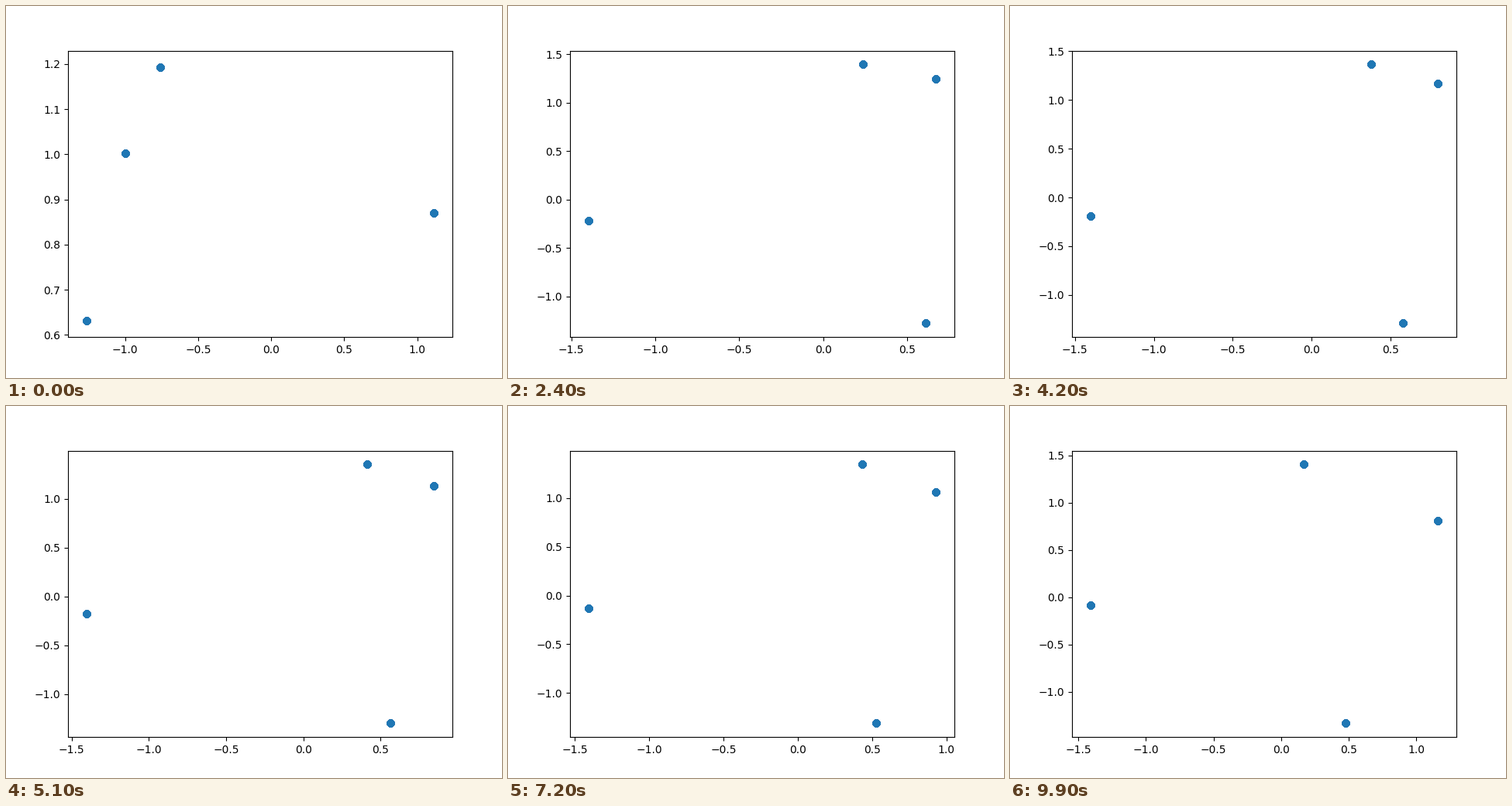
Animation, 640 px wide and 480 px high, one loop 10000 ms. Source, as a matplotlib script:

```python
import numpy as np
import matplotlib.pyplot as plt
from matplotlib.animation import FuncAnimation

FRAMES = 100
RADIUS = np.sqrt(2)
COPIES = 100     # stacked points give the hard marker edge
MARGIN = 0.05
MARKER_PX = 3    # marker extent counted into the data limits

# Degrees on the circle: middle of the pair, half its gap, third, fourth point
START = np.array([128.7, 6.2, 153.45, 37.95])
OVERSHOOT = np.array([80.9, 5.55, 210.0, -73.2])
SETTLED = np.array([71.03, 9.33, 188.94, -64.42])
END = np.array([59.02, 24.12, 183.5, -70.24])


def ease(u, k):
    """Exponential easing: k < 0 slows down, k > 0 speeds up, 0 is linear."""
    return np.expm1(k * u) / np.expm1(k) if k else u


def blend(a, b, u, rates):
    return a + (b - a) * np.array([ease(u, k) for k in rates])


def points(i):
    if i < 15:
        pose = blend(START, OVERSHOOT, i / 15, [-2] * 4)
    elif i < 24:
        pose = blend(OVERSHOOT, SETTLED, (i - 15) / 9, [-2] * 4)
    else:
        # the pair slows down while its gap opens faster and faster
        pose = blend(SETTLED, END, (i - 24) / 75, [-2.6, 5, 0, 0])
    mid, half, third, fourth = pose
    angles = np.radians([mid - half, mid + half, third, fourth])
    return RADIUS * np.cos(angles), RADIUS * np.sin(angles)


def limits(v, length):
    pad = MARKER_PX / length
    lo, hi = v.min() - pad, v.max() + pad
    extra = MARGIN * (hi - lo)
    return lo - extra, hi + extra


fig, ax = plt.subplots(figsize=(6.4, 4.8), dpi=100)
dots = ax.scatter(np.zeros(4 * COPIES), np.zeros(4 * COPIES), color="#1f77b4")
width, height = ax.bbox.width, ax.bbox.height


def update(i):
    x, y = points(i)
    dots.set_offsets(np.tile(np.column_stack([x, y]), (COPIES, 1)))
    ax.set_xlim(limits(x, width))
    ax.set_ylim(limits(y, height))
    return [dots]


anim = FuncAnimation(fig, update, frames=FRAMES, interval=100,
                     repeat=True, repeat_delay=0, blit=False)
plt.show()
```
